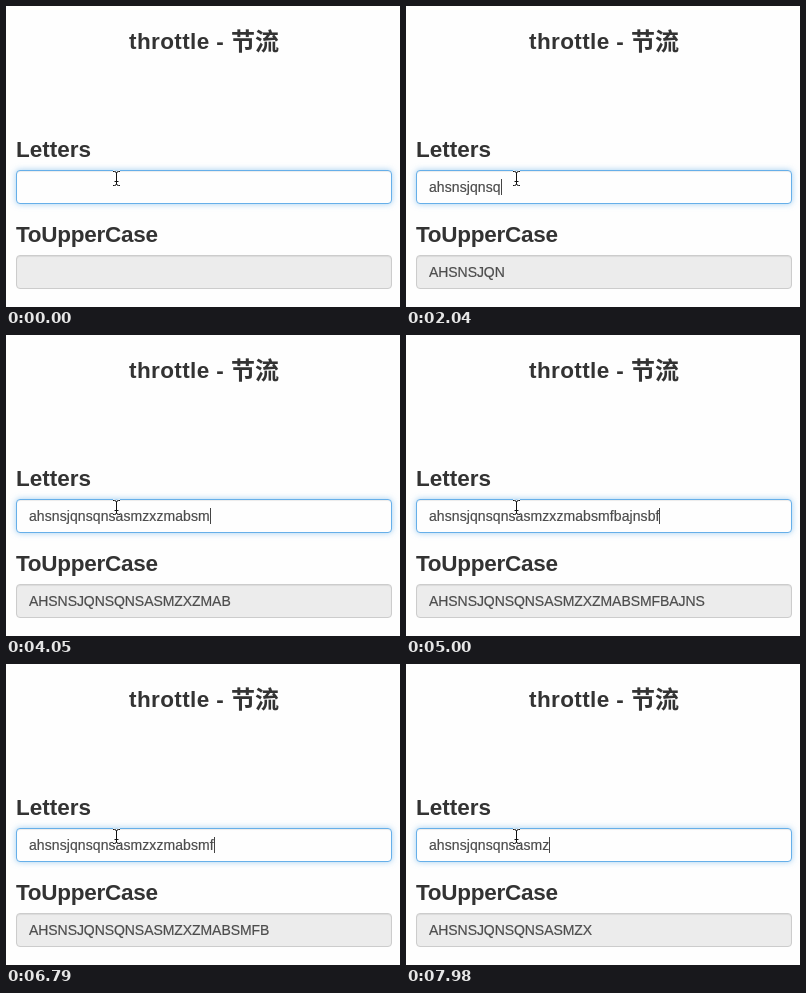
Write an HTML page that moves like this. It is 394 px wide and 301 px high and loops after 8000 ms.

```html
<!DOCTYPE html>
<html lang="en">
<head>
<meta charset="utf-8">
<title>throttle</title>
<style>
  html, body { margin: 0; width: 100%; height: 100%; overflow: hidden; background: #fefefe; }
  body { position: relative; font-family: "Liberation Sans", Arial, sans-serif; }
  body > * { position: absolute; box-sizing: border-box; white-space: pre; }
  .head { font-size: 22.5px; font-weight: bold; line-height: 27px; color: #333; }
  .cjk { font: bold 24px/35px "Noto Sans CJK SC", "Noto Sans CJK", sans-serif; color: #333; }
  .field { left: 10px; width: 376px; height: 34px; border: 1px solid #ccc; border-radius: 4px;
    background: #ececec; box-shadow: inset 0 1px 1px rgba(0,0,0,.075); }
  .focus { background: #fefefe; border-color: #66afe9;
    box-shadow: inset 0 1px 1px rgba(0,0,0,.075), 0 0 6px rgba(102,175,233,.6); }
  .value { left: 23px; font-size: 14px; line-height: 20px; color: #4c4c4c; -webkit-text-stroke: .2px #4c4c4c; }
  #caret { top: 173px; width: 1px; height: 16px; background: #444; }
</style>
</head>
<body>
<div class="head" style="left:123px;top:22px;letter-spacing:.4px">throttle - </div>
<div class="cjk" style="left:225px;top:16px">节流</div>
<div class="head" style="left:10px;top:130px">Letters</div>
<div class="field focus" style="top:164px"></div>
<div class="head" style="left:10px;top:215px;letter-spacing:-.25px">ToUpperCase</div>
<div class="field" style="top:249px"></div>
<div class="value" id="lower" style="top:171px;letter-spacing:.08px"></div>
<div class="value" id="upper" style="top:256px;letter-spacing:-.065px"></div>
<div id="caret"></div>
<svg style="left:104px;top:162px" width="14" height="21" fill="none">
  <defs>
    <path id="beam" d="M3 3.5H4.5Q6.5 3.5 6.5 5.5Q6.5 3.5 8.5 3.5H10M6.5 5V16M4.5 13.5H8.5M3 17.5H4.5Q6.5 17.5 6.5 15.5Q6.5 17.5 8.5 17.5H10"/>
  </defs>
  <use href="#beam" stroke="#fff" stroke-width="2.6"/>
  <use href="#beam" stroke="#111"/>
</svg>
<script>
const LOOP = 8000;
const STEP = 118.8;    // screen refresh in ms; all times below count in steps
const CARET_ON = 2;
const WAIT = 4.4;      // throttle interval
const TEXT = 'ahsnsjqnsqnsasmzxzmabsmfbajnsbfsa';

// Bursts of key presses: start, number of keys (negative deletes), gap.
const bursts = [
  [4.1, 5, 1.15], [10.5, 4, 1], [16.05, 3, 1], [20.95, 3, 1.52],
  [26.1, 4, .75], [30.25, 8, .95], [40, 6, .66],
  [45.5, -2, 1], [48.2, -6, 1.2], [56.5, -2, 1], [59.5, -4, 1], [64.5, -3, 1]
];
const keys = bursts.flatMap(([start, n, gap]) =>
  Array.from({ length: Math.abs(n) }, (_, i) => ({ at: start + i * gap, add: Math.sign(n) })));

// The throttled handler runs on keydown, so it copies the value before the key.
function fieldsAt(now) {
  let count = 0, copied = 0, last = -WAIT;
  for (const { at, add } of keys) {
    if (at > now) break;
    if (at - last >= WAIT) {
      copied = count;
      last = at;
    }
    count += add;
  }
  return { count, copied };
}

const [lower, upper, caret] = ['lower', 'upper', 'caret'].map(id => document.getElementById(id));

function draw(t) {
  const now = Math.floor(t / STEP);
  const { count, copied } = fieldsAt(now);
  lower.textContent = TEXT.slice(0, count);
  upper.textContent = TEXT.slice(0, copied).toUpperCase();
  caret.style.left = Math.round(23 + lower.getBoundingClientRect().width) + 'px';
  caret.style.visibility = now < CARET_ON ? 'hidden' : 'visible';
}

const start = performance.now();
function tick() {
  draw((performance.now() - start) % LOOP);
  requestAnimationFrame(tick);
}
tick();
</script>
</body>
</html>
```
